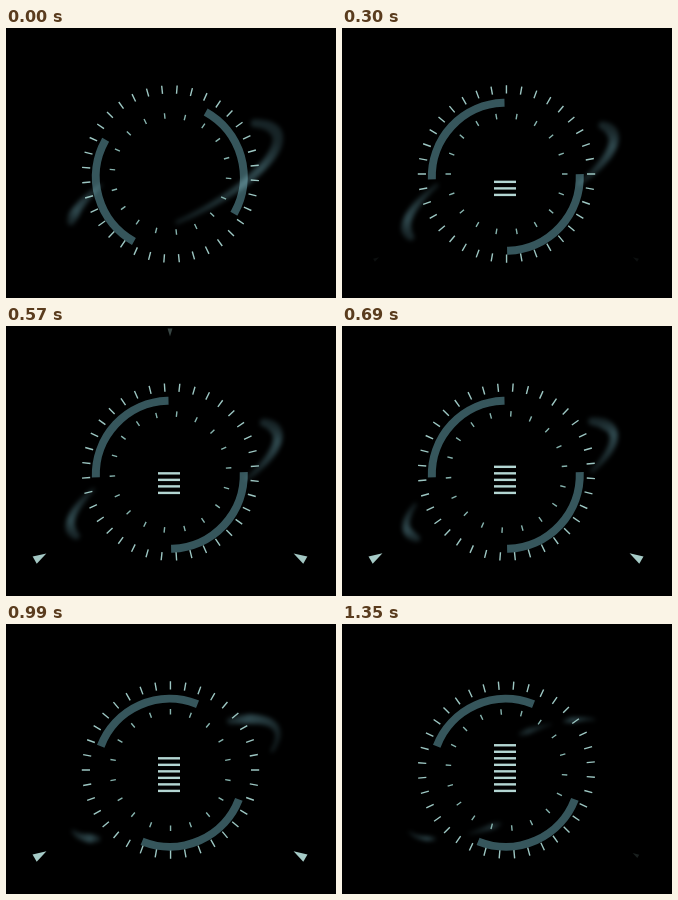
An HTML page with a canvas for the animation above (1.38 s loop, 330x270 px).

```html
<!DOCTYPE html>
<html lang="en">
<head>
<meta charset="utf-8">
<title>Dial</title>
<style>
html, body { margin: 0; width: 100%; height: 100%; overflow: hidden; background: #000; }
canvas { display: block; }
</style>
</head>
<body>
<canvas id="stage" width="330" height="270"></canvas>
<script>
const ctx = document.getElementById('stage').getContext('2d');
const LOOP = 1380, STEP = 30, TAU = 2 * Math.PI, RAD = Math.PI / 180;
const ORBIT = { x: 168, y: 155, long: 114, short: 37, tilt: -25.9 * RAD };

const mix = (a, b, k) => a + (b - a) * k;

// Smooth rise from 0 to 1 between two times.
function ramp(t, from, to) {
  const k = Math.min(1, Math.max(0, (t - from) / (to - from)));
  return k * k * (3 - 2 * k);
}

function orbitPoint(degrees) {
  const u = ORBIT.long * Math.cos(degrees * RAD), v = ORBIT.short * Math.sin(degrees * RAD);
  const cos = Math.cos(ORBIT.tilt), sin = Math.sin(ORBIT.tilt);
  return [ORBIT.x + u * cos - v * sin, ORBIT.y + u * sin + v * cos];
}

// A trail along the orbit, thick at its head and thin and dim at its tail.
function smoke(head, tail, radius, alpha) {
  const path = new Path2D(), count = Math.ceil((tail - head) / 1.5);
  for (let i = 0; i <= count; i++) {
    const k = i / count, [x, y] = orbitPoint(mix(head, tail, k));
    const r = radius * (1 - 0.65 * k) * mix(0.6, 1, Math.min(1, k * 5));
    path.moveTo(x + r, y);
    path.arc(x, y, r, 0, TAU);
  }
  const shade = ctx.createLinearGradient(...orbitPoint(head), ...orbitPoint(tail));
  shade.addColorStop(0, '#34505680');
  shade.addColorStop(0.25, '#345056');
  shade.addColorStop(1, '#34505660');
  ctx.save();
  ctx.globalCompositeOperation = 'screen';
  ctx.filter = 'blur(2.2px)';
  ctx.globalAlpha = alpha;
  ctx.fillStyle = shade;
  ctx.fill(path);
  ctx.restore();
}

function trails(t) {
  const burst = 1 - ramp(t, 0, 150), drift = ramp(t, 450, 1050), fade = ramp(t, 1200, 1380);
  const radius = mix(6.6, 5.6, drift) * (1 - 0.5 * fade);
  const right = -18 - 12 * burst - 31 * drift;
  const left = 172 + 24 * burst - 26 * drift;
  smoke(right, mix(57 + 40 * burst - 30 * drift, right + 18, fade), radius, 0.9);
  smoke(left, 234 - 60 * drift, radius * 0.9, 0.9);

  const wisp = 0.6 * ramp(t, 1020, 1200);
  if (wisp) for (const side of [0, 180]) smoke(side - 75, side - 58, 3.5, wisp);
}

function ticks(count, inner, outer, phase, color) {
  ctx.beginPath();
  for (let i = 0; i < count; i++) {
    const a = phase * RAD + i * TAU / count, x = Math.sin(a), y = -Math.cos(a);
    ctx.moveTo(164.5 + x * inner, 146 + y * inner);
    ctx.lineTo(164.5 + x * outer, 146 + y * outer);
  }
  ctx.strokeStyle = color;
  ctx.lineWidth = 1.4;
  ctx.stroke();
}

function arcs(t) {
  const turn = 29 + 59 * ramp(t, 0, 120) + 23 * ramp(t, 810, 960);
  ctx.save();
  ctx.filter = 'blur(0.5px)';
  ctx.strokeStyle = '#36565c';
  ctx.lineWidth = 8;
  for (const start of [turn, turn + 180]) {
    ctx.beginPath();
    ctx.arc(163.8, 148.8, 74, (start - 90) * RAD, (start + 1) * RAD);
    ctx.stroke();
  }
  ctx.restore();
}

function bars(t) {
  const count = Math.floor(1.69 * ramp(t, 0, 45) + t / 190);
  ctx.fillStyle = '#b4d6d3';
  for (let i = 0; i < count; i++) ctx.fillRect(152, 165.7 - i * 6.52, 22, 2.4);
}

// An arrow on the outer rim that points at the centre.
function arrow(degrees, strength) {
  const size = mix(0.4, 1.05, strength);
  ctx.save();
  ctx.translate(164, 156);
  ctx.rotate(degrees * RAD);
  ctx.translate(0, -149.5);
  ctx.scale(size, size);
  ctx.globalAlpha = strength;
  ctx.fillStyle = '#a6cbc7';
  ctx.beginPath();
  ctx.moveTo(0, 6.5);
  ctx.lineTo(-4, -6.5);
  ctx.lineTo(4, -6.5);
  ctx.fill();
  ctx.restore();
}

function draw(t) {
  ctx.fillStyle = '#000';
  ctx.fillRect(0, 0, 330, 270);

  arcs(t);
  trails(t);
  const phase = -5.7 - 20 * t / LOOP;
  ticks(36, 80.5, 88.7, phase, '#9cc6c2');
  ticks(18, 55.5, 61, phase, '#86b3ae');
  bars(t);

  const rise = ramp(t, 240, 600);
  arrow(0, 0.45 * ramp(t, 330, 450) * (1 - ramp(t, 540, 630)));
  arrow(240, rise * (1 - ramp(t, 1080, 1230)));
  arrow(120, rise * (1 - ramp(t, 1080, 1440)));
}

const begin = performance.now();
function frame() {
  const t = (performance.now() - begin) % LOOP;
  draw(Math.floor(t / STEP) * STEP);
  requestAnimationFrame(frame);
}
frame();
</script>
</body>
</html>
```
